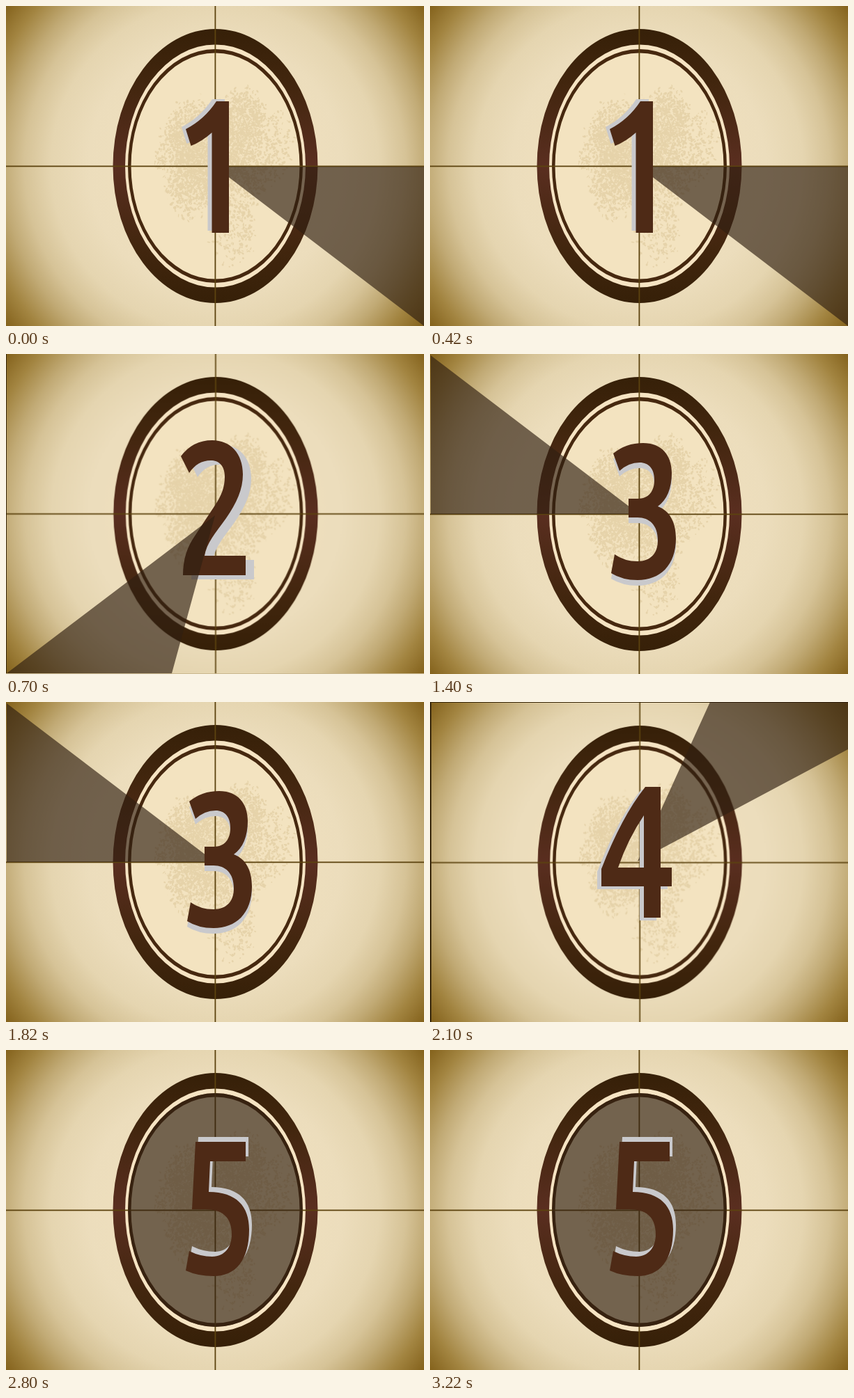
Animation, 600 px wide and 460 px high, one loop 3.5 s. Source, as an HTML page with a canvas:

```html
<!DOCTYPE html>
<html lang="en">
<head>
<meta charset="utf-8">
<title>Film countdown</title>
<style>
  html, body { margin: 0; width: 100%; height: 100%; overflow: hidden; }
  canvas { display: block; }
</style>
</head>
<body>
<canvas id="stage" width="600" height="460"></canvas>
<script>
const W = 600, H = 460, CX = 300.5, CY = 230;
const STEP = 700;
const ctx = document.getElementById('stage').getContext('2d');

// Each leader: digit outline, shadow offset, sweep shape, frame inset.
const leaders = [
  {
    digit: 'M302 137H320V326H295.5V182Q281 195 265.5 201L258 177Q285 163 302 137Z',
    shadow: [-6, -3],
    sweep: 'M300 231H600V460Z',
    inset: [0, 0, 0]
  },
  {
    digit: 'M251 147Q268 124 296 124C322 124 340 143 340 173C340 195 331 214 316 236' +
      'C300 258 288 272 285 290H344V318H254C254 295 260 277 272 260L299 219' +
      'C309 204 314 192 314 176C314 160 305 153 294 153C281 153 271 159 263 171Z',
    shadow: [12, 6],
    sweep: 'M300 232L1 459H238Z',
    sweepOnTop: true,
    inset: [1, 0, 1]
  },
  {
    digit: 'M263 143Q281 128 306 128C332 128 347 145 347 171C347 193 340 210 327 219' +
      'C345 226 353 243 353 265C353 304 330 325 298 325Q276 325 260 315L265 288' +
      'Q279 298 298 298C317 298 327 286 327 268C327 246 315 235 298 235H285V208H298' +
      'C314 208 322 197 322 181C322 165 314 156 301 156Q285 156 272 168Z',
    shadow: [0, 8],
    sweep: 'M300 230L1 2V230Z',
    inset: [0, 0, 0]
  },
  {
    digit: 'M309 122H331V238H347V265H331V310H307V265H246V240Q275 165 309 122Z' +
      'M307 163Q284 197 270 238H307Z',
    shadow: [-6, 4],
    sweep: 'M298 229L402 0H600V68Z',
    inset: [1.5, 1, 0]
  },
  {
    digit: 'M272 132H344V160H293L291 204C331 204 349 225 349 258C349 302 330 325 298 325' +
      'Q275 325 258 317L263 289Q279 297 296 297C314 297 324 283 324 265' +
      'C324 240 310 229 286 229H267Z',
    shadow: [4, -7],
    sweep: null,
    inset: [0, 0, 0]
  }
].map(l => ({ ...l, digit: new Path2D(l.digit), sweep: l.sweep ? new Path2D(l.sweep) : oval(125, 168) }));

function oval(rx, ry) {
  const path = new Path2D();
  path.ellipse(CX, CY, rx, ry, 0, 0, Math.PI * 2);
  return path;
}

function band(outer, inner) {
  const path = oval(...outer);
  path.addPath(oval(...inner));
  return path;
}

function randomizer(seed) {
  return () => {
    seed = (seed * 1664525 + 1013904223) >>> 0;
    return seed / 4294967296;
  };
}

function fill(c, path, color) {
  c.fillStyle = color;
  c.fill(path, 'evenodd');
}

function drawStain(c) {
  const rand = randomizer(41);
  const speck = (x, y, spreadX, spreadY, size) => {
    const a = rand() * Math.PI * 2, d = Math.sqrt(rand()) * (0.55 + rand() * 0.45);
    c.beginPath();
    c.ellipse(x + Math.cos(a) * d * spreadX, y + Math.sin(a) * d * spreadY,
      size * (0.4 + rand()), size * (0.3 + rand() * 0.6), rand() * 3, 0, Math.PI * 2);
    c.fill();
  };
  // centre x, y, radii, number of specks
  const clusters = [
    [266, 185, 42, 56, 650], [340, 163, 38, 52, 650], [296, 215, 66, 75, 1300],
    [264, 255, 40, 58, 550], [325, 245, 58, 65, 650], [375, 200, 44, 66, 300],
    [325, 320, 40, 58, 230], [238, 210, 30, 42, 170]
  ];
  c.fillStyle = '#e6d3aa';
  for (const [x, y, rx, ry, count] of clusters)
    for (let i = 0; i < count; i++) speck(x, y, rx, ry, 2);
  c.fillStyle = '#f0dfba';
  for (let i = 0; i < 420; i++) speck(300, 225, 85, 105, 1.3);
}

function makeScene() {
  const canvas = document.createElement('canvas');
  canvas.width = W;
  canvas.height = H;
  const c = canvas.getContext('2d');

  const glow = c.createRadialGradient(300, 230, 0, 300, 230, 380);
  [[0, '#f3e3c0'], [0.48, '#ecddbc'], [0.62, '#e5d5b0'], [0.72, '#d6c397'],
   [0.8, '#c1aa75'], [0.9, '#a28440'], [1, '#82601a']]
    .forEach(([at, color]) => glow.addColorStop(at, color));
  c.fillStyle = glow;
  c.fillRect(0, 0, W, H);

  fill(c, oval(140, 190), '#f6e4c3');
  fill(c, oval(122, 164), '#f3e3c0');
  drawStain(c);

  const wood = c.createLinearGradient(0, 33, 0, 427);
  wood.addColorStop(0, '#362008');
  wood.addColorStop(0.2, '#42260e');
  wood.addColorStop(0.5, '#5a2e20');
  wood.addColorStop(0.8, '#42260e');
  wood.addColorStop(1, '#362008');
  fill(c, band([147, 197], [129.5, 174.5]), wood);
  fill(c, band([125.5, 168], [121, 162.5]), '#46280f');

  c.fillStyle = '#5c430f';
  c.fillRect(0, 229.5, W, 1.8);
  c.fillRect(299.5, 0, 1.8, H);
  return canvas;
}

const scene = makeScene();

function drawSweep(leader) {
  fill(ctx, leader.sweep, 'rgba(48,32,18,0.65)');
}

function drawLeader(leader) {
  const [left, top, bottom] = leader.inset;
  ctx.fillStyle = '#3a290c';
  ctx.fillRect(0, 0, W, H);
  if (bottom) {
    ctx.fillStyle = '#cbb991';
    ctx.fillRect(0, H - bottom, W, bottom);
  }
  ctx.save();
  ctx.translate(left, top);
  ctx.scale((W - left) / W, (H - top - bottom) / H);
  ctx.drawImage(scene, 0, 0);
  ctx.restore();

  if (!leader.sweepOnTop) drawSweep(leader);
  ctx.save();
  ctx.translate(...leader.shadow);
  fill(ctx, leader.digit, '#c9c9cc');
  ctx.restore();
  fill(ctx, leader.digit, '#4e2a16');
  if (leader.sweepOnTop) drawSweep(leader);
}

function tick() {
  drawLeader(leaders[Math.floor(performance.now() / STEP) % leaders.length]);
  requestAnimationFrame(tick);
}
tick();
</script>
</body>
</html>
```
